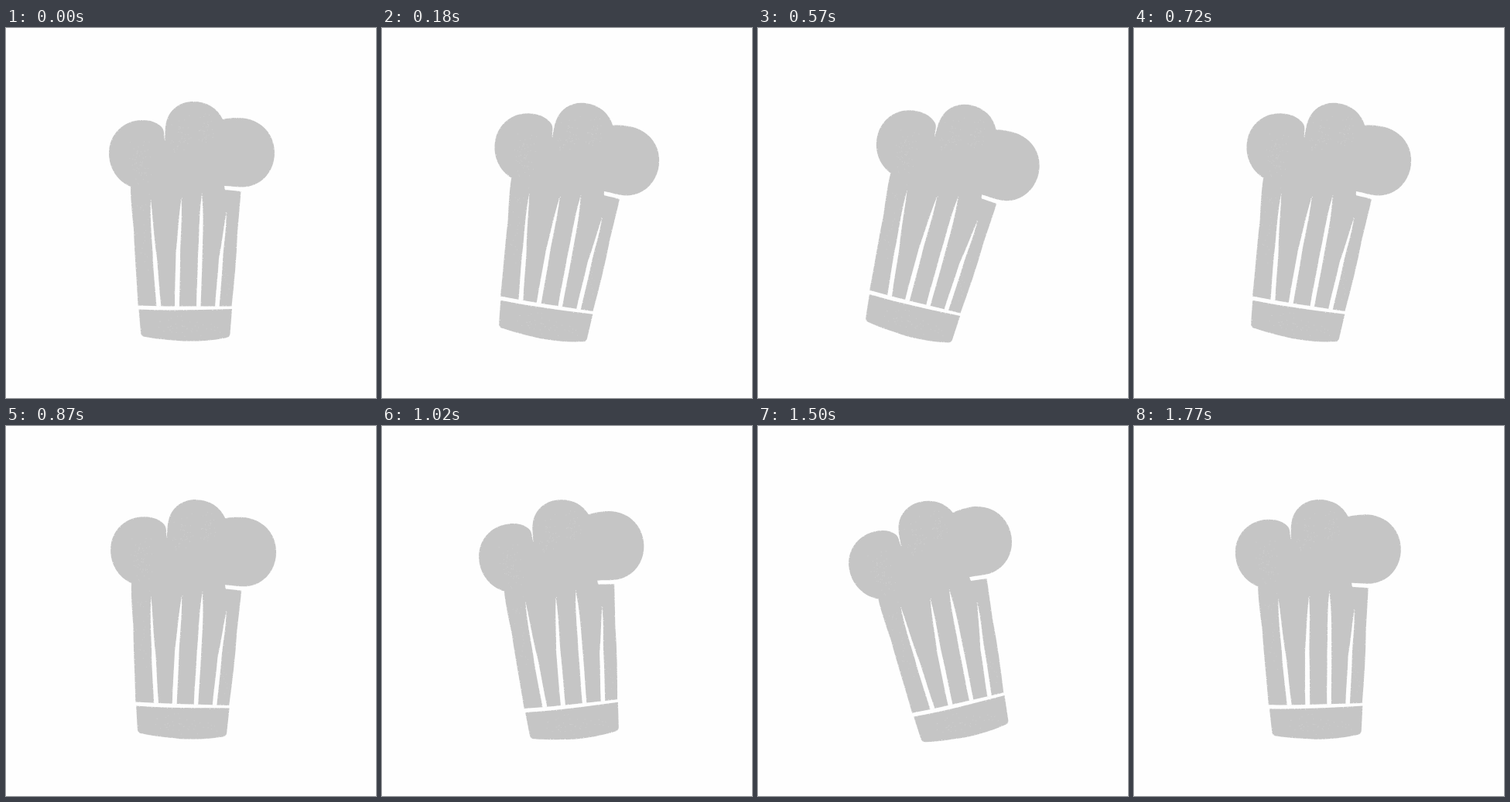
Recreate the animation shown at these times as an HTML page. Size 478 by 478 pixels, loop 1800 ms.

```html
<!DOCTYPE html>
<html lang="en">
<head>
<meta charset="utf-8">
<title>Swaying chef hat</title>
<style>
  html, body { margin: 0; width: 100%; height: 100%; overflow: hidden; background: #fefefe; }
  svg { display: block; width: 100vw; height: 100vh; }
  .felt { fill: #c5c5c5; }
  .cut { fill: #fefefe; }
  .specks { fill: none; stroke-linecap: round; }
</style>
</head>
<body>
<svg viewBox="0 0 478 478">
  <g id="hat">
    <path class="felt edge" d="M161 205 C144 198 133 181 133 162 C133 137 152 119 176 119
      C187 119 196 122 202 129 C205 134 204 139 205 145 C206 137 205 129 207 122
      C211 105 225 95 242 95 C259 95 273 103 280 118
      C286 116.500 293 116 300 116 C328 116 347 136 347 161 C347 187 328 206 304 205.500
      C296 205.500 289 204 282 204 L283 209 C290 210 297 210 303.500 211
      C302 230 300.500 247 299 264 C298 296 295 328 291.500 359.500
      C252 359.500 211 360 170.500 358.500 C169 324 166 292 165 260 C163 240 161 223 161 205 Z"/>
    <path class="felt edge" d="M171.500 363.500 C211 365.500 252 364 292 363 L289.500 395
      C289 399 287 400 283 400.500 C265 404 246 405 229 404.500 C212 403 194 402 180 399
      C176 398.500 174.500 397 174 393 Z"/>
    <g class="cut">
      <path class="edge" d="M187 222 C190 246 191 271 195 297 C197 318 198 340 200.500 360 L194.500 360 C193 338 190 314 189.500 290 C188 267 186 244 187 222 Z"/>
      <path class="edge" d="M226.500 220 C228 246 225 272 225 299 C225 320 224 341 224 361 L218 361 C218 338 219 314 219.500 291 C222 267 223 243 226.500 220 Z"/>
      <path class="edge" d="M253 215 C256 243 254 272 253.500 300 C253 321 252 341 251.500 361 L246 361 C246 338 248 316 248 294 C250 267 249 241 253 215 Z"/>
      <path class="edge" d="M284.500 239 C285 260 281 280 280 301 C279 321 277 341 275.500 361 L270 361 C271 340 274 319 275 298 C279 278 281 258 284.500 239 Z"/>
    </g>
    <path id="fray" class="specks" stroke="#f4f4f4" stroke-width="1"/>
    <path id="grain" class="specks" stroke="#d0d0d0" stroke-width=".9"/>
  </g>
</svg>
<script>
const LOOP = 1800, STEP = 30, SWING = 15, CENTER = 239;
const hat = document.getElementById("hat");

function seeded(seed) {
  return () => (seed = (seed * 16807) % 2147483647) / 2147483647;
}
const rand = seeded(4271);
const spread = size => (rand() + rand() - 1) * size;
const dot = (x, y) => `M${x.toFixed(1)} ${y.toFixed(1)}h.1`;

// Chalky flecks along every cut edge
function frayEdges() {
  let d = "";
  for (const edge of document.querySelectorAll(".edge")) {
    const length = edge.getTotalLength();
    for (let at = 0; at < length; at += 2 + rand() * 6) {
      const p = edge.getPointAtLength(at);
      d += dot(p.x + spread(1), p.y + spread(1));
    }
  }
  document.getElementById("fray").setAttribute("d", d);
}

// Faint dry-brush patches: centre x, centre y, half width, half height, count
function brushGrain() {
  const patches = [
    [173, 172, 18, 32, 55], [226, 140, 14, 32, 40], [258, 130, 14, 28, 35],
    [178, 260, 10, 80, 25], [232, 385, 50, 16, 45], [284, 320, 10, 60, 15]
  ];
  let d = "";
  for (const [x, y, w, h, count] of patches)
    for (let i = 0; i < count; i++) d += dot(x + spread(w), y + spread(h));
  document.getElementById("grain").setAttribute("d", d);
}

function draw(time) {
  const t = Math.floor((time % LOOP) / STEP) * STEP;
  const angle = SWING * Math.sin(2 * Math.PI * t / LOOP);
  hat.setAttribute("transform", `rotate(${angle.toFixed(3)} ${CENTER} ${CENTER})`);
}

frayEdges();
brushGrain();
draw(0);
let start;
requestAnimationFrame(function tick(now) {
  start ??= now;
  draw(now - start);
  requestAnimationFrame(tick);
});
</script>
</body>
</html>
```
